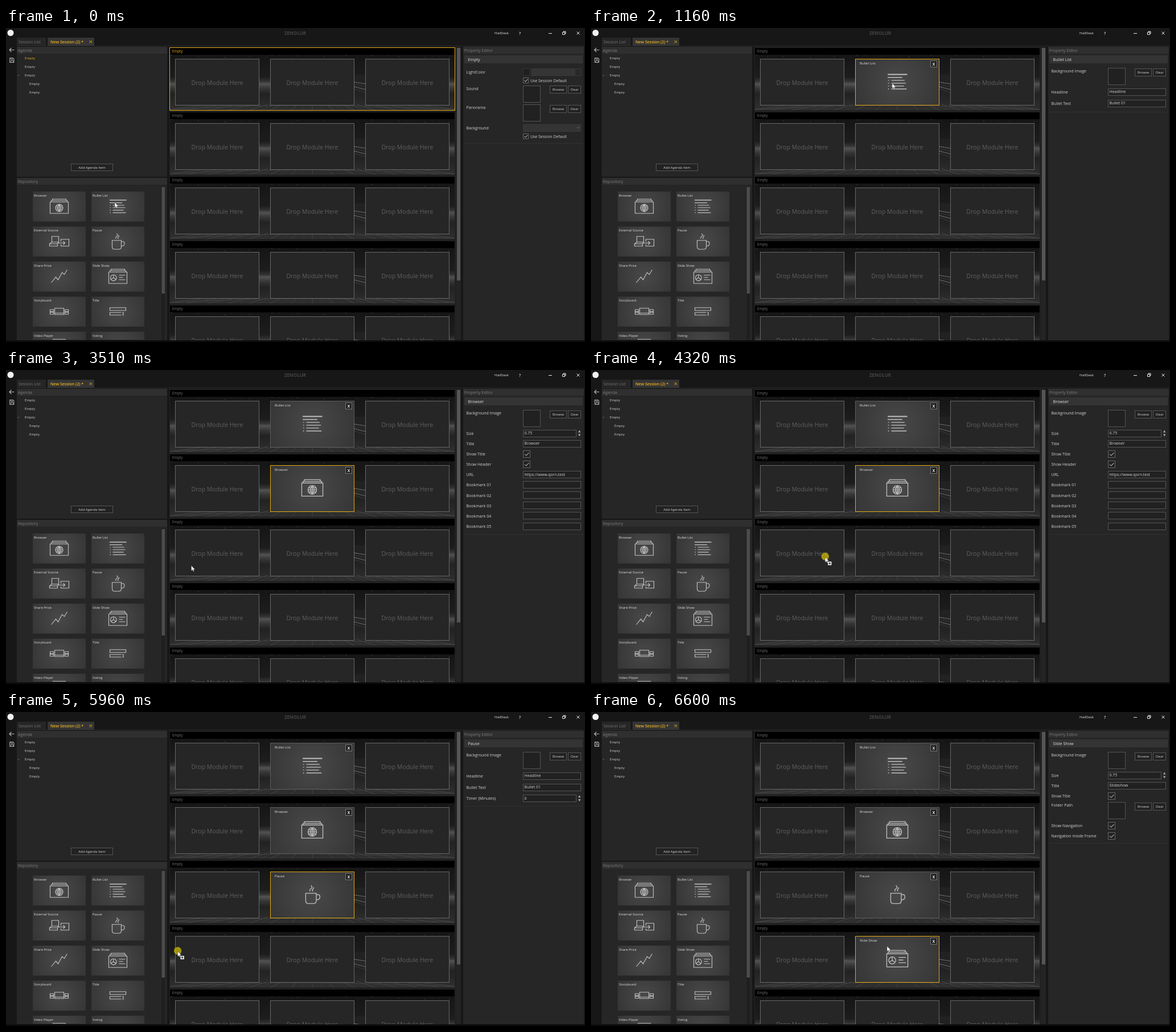
Write an HTML page with a canvas that moves like this. It is 1017 px wide and 551 px high and loops after 7.53 s.

```html
<!DOCTYPE html>
<html lang="en">
<head>
<meta charset="utf-8">
<title>Session editor</title>
<style>
html, body { margin: 0; width: 100%; height: 100%; overflow: hidden; background: #171717; }
canvas { display: block; }
</style>
</head>
<body>
<canvas id="stage" width="1017" height="551"></canvas>
<script>
const g = document.getElementById('stage').getContext('2d');
const LOOP = 7530, GOLD = '#e3a812', LIGHT = '#d2d2d2', LINE = '#545454';

// Pointer path: time, x, y
const path = [
  [0, 191, 306], [70, 191, 306], [400, 340, 210], [740, 529, 97], [1440, 529, 97],
  [1700, 345, 265], [1900, 165, 353], [2090, 93, 306], [2260, 92, 304], [2440, 270, 262],
  [2670, 505, 209], [2790, 529, 212], [3160, 529, 212], [3510, 326, 343], [3720, 235, 377],
  [3910, 200, 369], [3980, 200, 368], [4260, 370, 335], [4540, 529, 311], [4930, 529, 311],
  [5200, 330, 420], [5400, 200, 440], [5550, 167, 435], [5690, 167, 434], [5760, 169, 434],
  [5960, 301, 420], [6200, 455, 412], [6420, 520, 411], [LOOP, 520, 411]
];

const drags = [
  { name: 'Bullet List', press: 70, hover: 750, release: 890, drop: 960 },
  { name: 'Browser', press: 2260, hover: 2740, release: 3160, drop: 3230 },
  { name: 'Pause', press: 3980, hover: 4530, release: 4860, drop: 4930 },
  { name: 'Slide Show', press: 5760, hover: 6390, release: 6530, drop: 6600 }
];

// Property rows: kind, label, centre y, value
const picture = ['image', 'Background Image', 75.5];
const headline = ['field', 'Headline', 112, 'Headline'];
const bullet = ['field', 'Bullet Text', 132, 'Bullet 01'];
const size = ['spin', 'Size', 111, '0.75'];
const showTitle = ['check', 'Show Title', 147.5];
const properties = {
  'Empty': { end: 202, rows: [
    ['colour', 'LightColor', 77], ['image', 'Sound', 106], ['image', 'Panorama', 139.5], ['list', 'Background', 175]] },
  'Bullet List': { end: 147, rows: [picture, headline, bullet] },
  'Browser': { end: 288, rows: [
    picture, size, ['field', 'Title', 129, 'Browser'], showTitle, ['check', 'Show Header', 165.5],
    ['field', 'URL', 183.5, 'https://www.qorn.test'],
    ...[1, 2, 3, 4, 5].map(n => ['field', 'Bookmark 0' + n, 183.5 + n * 18.1, ''])] },
  'Pause': { end: 165, rows: [picture, headline, bullet, ['spin', 'Timer (Minutes)', 151.5, '0']] },
  'Slide Show': { end: 230, rows: [
    picture, size, ['field', 'Title', 129, 'Slideshow'], showTitle, ['image', 'Folder Path', 163.5],
    ['check', 'Show Navigation', 199.5], ['check', 'Navigation inside Frame', 217.5]] }
};

function fill(x, y, w, h, colour) {
  g.fillStyle = colour;
  g.fillRect(x, y, w, h);
}
function box(x, y, w, h, inside, edge) {
  x = Math.round(x); y = Math.round(y);
  if (inside) fill(x, y, w, h, inside);
  g.strokeStyle = edge;
  g.lineWidth = 1;
  g.strokeRect(x + .5, y + .5, w - 1, h - 1);
}
function text(s, x, y, px = 7, colour = LIGHT, weight = 400, align = 'left') {
  g.font = `${weight} ${px}px "Open Sans", "Noto Sans", sans-serif`;
  g.textAlign = align;
  g.fillStyle = colour;
  g.fillText(s, x, y);
}
function draw(d, colour = LIGHT, width = 1, solid) {
  const p = new Path2D(d);
  g.strokeStyle = g.fillStyle = colour;
  g.lineWidth = width;
  solid ? g.fill(p) : g.stroke(p);
}
function dot(x, y, r, colour) {
  g.fillStyle = colour;
  g.beginPath();
  g.arc(x, y, r, 0, 7);
  g.fill();
}
function clipped(x, y, w, h, paint) {
  g.save();
  g.beginPath();
  g.rect(x, y, w, h);
  g.clip();
  paint();
  g.restore();
}

const folder = 'M-16-8H16V12H-16ZM-14-8V-10.5H14V-8M-12-10.5V-13H12V-10.5';
const icons = {
  'Browser': folder + 'M-6.500 2.500a6.500 6.500 0 1 0 13 0a6.500 6.500 0 1 0-13 0H6.500M0-4V9M0-4q-6 6.500 0 13q6-6.500 0-13M-5.500-.5H5.500M-5.500 5.500H5.500',
  'Bullet List': 'M-14.500-11.500H15M-14.500-11H15M-14.500-6.700H7.500M-9-2.300H11M-9 2H13M-9 6.400H10M-9 10.800H14' +
    [-2.3, 2, 6.4, 10.8].map(y => `M-14 ${y}h1.5`).join(''),
  'External Source': 'M-13-9H-1V1H-13ZM-17 4H-3V8H-17ZM-13 1L-17 4M-1 1L-3 4M3 0V-4H17V8H3V5M-3 2.500H10M7-.5L10 2.500L7 5.500',
  'Pause': 'M-10-2H6V9Q6 13.500 1.500 13.500H-5.500Q-10 13.500-10 9ZM6 0H9Q11.500 0 11.500 3.500Q11.500 8 6 8M-3-5Q-5-7-2-9T-2-14M1-5Q-1-7 1-8.500T1-11',
  'Share Price': 'M-14 10.500L-6 1L-2 5.500L5-7L9-4L14-12M-7 1h2M-3 5.500h2M4-7h2M8-4h2',
  'Slide Show': folder + 'M-13 2a5.300 5.300 0 1 0 10.600 0a5.300 5.300 0 1 0-10.600 0M-7.700-3.300V2L-3.500 5M-7.700 2L-12 4.500M2-2.500H13M2 1.500H9M2 5.500H13',
  'Storyboard': 'M-8-6H8V5H-8ZM-8 2.500H8M-16-3.500H-10V0H-16ZM-16 1H-10V4.500H-16ZM10-3.500H16V0H10ZM10 1H16V4.500H10Z',
  'Title': 'M-14-7H14V-2H-14ZM6 1.500H-14V6H6M8 1.500h2.500M9.200 1.500V6M8 6h2.500',
  'Video Player': 'M-11-13H11V12H-11Z',
  'Voting': ''
};

function tile(x, y, w, h, name, scale) {
  const cx = x + w / 2, cy = y + h / 2;
  const shade = g.createRadialGradient(cx, cy, 0, cx, cy, w * .58);
  shade.addColorStop(0, '#494949');
  shade.addColorStop(1, '#353535');
  fill(x, y, w, h, shade);
  g.save();
  g.translate(cx, cy - (scale > 1 ? .5 : 0));
  g.scale(scale, scale);
  draw(icons[name], '#c0c0c0', 1.15);
  g.restore();
}

function tick(x, y, side) {
  box(x, y, side, side, '#222', '#666');
  const s = side / 13;
  draw(`M${x + 3 * s} ${y + 6.5 * s}l${2.7 * s} ${2.7 * s}l${4.8 * s} ${-5.2 * s}`, '#e4e4e4');
}
function button(x, y, w, label, h = 14) {
  box(x, y, w, h, '#222', LINE);
  text(label, x + w / 2, y + h / 2 + 2.2, 5.9, LIGHT, 400, 'center');
}

function frame() {
  fill(0, 0, 1017, 551, '#171717');
  dot(8, 8.5, 5.5, '#f2f2f2');
  text('ZENOLUR', 508, 12, 8.1, '#444', 700, 'center');
  text('HallDesk', 858, 11, 6.1, '#e5e5e5');
  text('?', 901, 11.5, 7, '#e5e5e5', 600);
  draw('M953 9.500h6M977.500 7.500h4v4h-4ZM979 7.500V6h4v4h-1.500M1002.500 6.500l5 5m0-5l-5 5', '#e5e5e5');
  draw('M14.500 38.500H6M9.500 35L6 38.500L9.500 42', '#bbb', 1.1);
  draw('M6.500 52.500h6l1.500 1.500v6.500h-7.500ZM8.500 52.500v2.500h3.500v-2.500M8.500 60v-3h4v3', '#aaa');

  fill(19, 17, 51, 14, '#262626');
  text('Session List', 22, 26.5, 7.2, '#747474');
  fill(73, 17, 82, 14, '#353535');
  text('New Session (2) *', 78, 27, 7, '#f0b41c', 600);
  draw('M146.500 22l4.500 4.500m0-4.500l-4.500 4.500', GOLD);
  fill(19, 31, 998, 1, '#2a2a2a');

  for (const [x, y, w, h, label] of [
    [19, 33, 264, 228, 'Agenda'], [19, 263, 264, 285, 'Repository'], [803, 33, 212, 515, 'Property Editor']]) {
    fill(x, y, w, h, '#262626');
    fill(x, y, w, 12, '#2f2f2f');
    text(label, x + 2, y + 9, 7.1, '#7c7c7c');
  }
  fill(0, 548, 1017, 3, '#0d0d0d');
}

function agenda(active) {
  for (let i = 0; i < 5; i++)
    text('Empty', i > 2 ? 41 : 33, 55.3 + i * 14.85, 6.1, !i && active ? '#f0b41c' : LIGHT);
  draw('M20.500 82.500l1.500 1.500l1.500-1.500', '#777', .8);
  button(114, 238, 74, 'Add Agenda Item', 13);
}

function repository() {
  fill(273, 277, 6, 271, '#1f1f1f');
  fill(273.5, 279, 5.5, 187, '#4c4c4c');
  clipped(19, 276, 254, 271, () => Object.keys(icons).forEach((name, i) => {
    const x = i % 2 ? 150 : 47, y = 287 + (i >> 1) * 61.5;
    tile(x, y, 93, 52.5, name, 1);
    text(name, x + 2, y + 8.7, 5.9, '#e0e0e0');
  }));
}

// Dim stadium behind the slots
function stadium(y) {
  const sky = g.createLinearGradient(0, y + 13, 0, y + 111);
  [[0, '#151515'], [.4, '#1d1d1d'], [.48, '#343434'], [.52, '#525252'], [.6, '#363636'], [.7, '#222'], [1, '#303030']]
    .forEach(([stop, colour]) => sky.addColorStop(stop, colour));
  fill(288, y + 13, 500, 98, sky);
  for (let i = 0; i < 34; i++) {
    const r = Math.abs(Math.sin(i * 91.7) * 437) % 1;
    fill(290 + i * 14.6 + r * 9, y + 13.5 + r * 5, 1.2, .8, i % 3 ? '#3c3c3c' : '#666');
  }
  fill(612, y + 48, 19, 32, '#222');
  g.setLineDash([2, 1]);
  for (let i = 0; i < 4; i++)
    draw(`M612 ${y + 61 + i * 4}l19 ${3 + i}`, i % 2 ? '#3a3a3a' : '#727272', 1.5);
  g.setLineDash([]);
  for (let i = -14; i <= 14; i++)
    draw(`M${538 + i * 13} ${y + 100}L${538 + i * 19} ${y + 111}`, i % 2 ? '#383838' : '#484848', .9);
  draw(`M288 ${y + 109}Q420 ${y + 101} 538 ${y + 102}T788 ${y + 109}`, '#464646', .8);
}

function sessionRow(i, t, latest) {
  const y = 34 + i * 113, drag = drags[i], active = !i && latest < 0;
  stadium(y);
  fill(287, y, 502, 13, '#000');
  text('Empty', 292, y + 8.7, 6.2, active ? '#f0b41c' : '#757575');
  for (const x of [297, 464, 631]) {
    const middle = x === 464 && drag;
    if (middle && t >= drag.drop) {
      tile(x, y + 20, 148, 82, drag.name, 1.16);
      box(x, y + 20, 148, 82, null, i === latest ? GOLD : '#5c5c5c');
      text(drag.name, x + 8, y + 29.8, 6.1, '#e0e0e0');
      box(x + 132, y + 23, 12, 12, '#222', '#777');
      text('X', x + 138, y + 31.6, 6.6, '#eee', 700, 'center');
      continue;
    }
    const hovered = middle && t >= drag.hover;
    box(x, y + 20, 148, 82, '#262626', '#686868');
    if (hovered) {
      fill(x - 1, y + 19, 150, 82, '#165a18');
      g.strokeStyle = '#858585';
      g.lineWidth = 1.8;
      g.strokeRect(x + .5, y + 23, 147, 76);
    }
    text('Drop Module Here', x + 74, y + 65.5, 10.5, hovered ? '#34703a' : '#606060', 500, 'center');
  }
  box(287, y, 502, 111, null, active ? GOLD : '#242424');
}

function sessions(t, latest) {
  fill(287, 33, 512, 515, '#202020');
  clipped(287, 33, 502, 515, () => {
    for (let i = 0; i < 5; i++) sessionRow(i, t, latest);
  });
  fill(791, 34, 8, 514, '#242424');
  fill(792, 35, 6, 408, '#555');
}

function propertyEditor(name) {
  const { rows, end } = properties[name];
  fill(805, 48, 208, 14, '#343434');
  text(name, 811.5, 57.8, 7.2, '#e0e0e0');
  fill(805, end, 208, 1, '#303030');
  for (const [kind, label, y, value] of rows) {
    text(label, 808.5, y + 2.8, 7.05);
    if (kind === 'image') {
      box(908, y - 5.5, 31, 30, '#212121', LINE);
      button(955, Math.round(y - 5), 30, 'Browse');
      button(987, Math.round(y - 5), 23, 'Clear');
    } else if (kind === 'check') {
      tick(908, Math.round(y - 6.5), 13);
    } else if (kind === 'field' || kind === 'spin') {
      box(908, y - 6.5, kind === 'spin' ? 94 : 102, 13, '#212121', LINE);
      text(value, 910.5, y + 2.4, 7);
      if (kind === 'spin')
        draw(`M1005 ${y - 1.5}l2.200-4l2.200 4ZM1005 ${y + 1.5}l2.200 4l2.200-4Z`, '#aaa', 1, true);
    } else {
      if (kind === 'colour') {
        box(908, y - 6, 13, 13, '#202020', '#343434');
        box(923, y - 6, 87, 13, '#353535', '#3b3b3b');
        fill(1000, y - 5, 9, 11, '#282828');
      } else {
        box(908, y - 6, 102, 13, '#343434', '#3b3b3b');
        draw(`M1003 ${y - 1}l2 2l2-2`, '#666');
      }
      tick(908, y + 10, 10);
      text('Use Session Default', 921, y + 17.8, 6.95);
    }
  }
}

function pointerAt(t) {
  const i = path.findIndex(k => k[0] > t) - 1;
  const a = path[i], b = path[i + 1], span = b[0] - a[0], u = (t - a[0]) / span;
  const slope = (k, c) => {
    const p = path[k - 1], q = path[k], n = path[k + 1];
    return !p || !n || p[c] === q[c] || q[c] === n[c] ? 0 : (n[c] - p[c]) / (n[0] - p[0]);
  };
  return [1, 2].map(c => {
    const ease = u * u * (3 - 2 * u);
    return a[c] + (b[c] - a[c]) * ease +
      span * u * (1 - u) * ((1 - u) * slope(i, c) - u * slope(i + 1, c));
  });
}

function pointer(t) {
  const [x, y] = pointerAt(t);
  const dragging = drags.some(d => t >= d.press && t < d.release);
  g.save();
  g.translate(x, y);
  if (dragging) {
    dot(0, -1, 6.7, 'rgba(190,174,10,.82)');
    box(5, 8, 6, 6, '#fff', '#ddd');
    draw('M6 11h4M8 9v4', '#111');
  }
  const arrow = 'M0 0V9.200L2.200 7.300L3.600 10.400L5 9.800L3.700 6.800H6.500Z';
  draw(arrow, '#fff', 1, true);
  draw(arrow, '#222', .4);
  g.restore();
}

function render(now) {
  const t = now % LOOP;
  const latest = drags.filter(d => t >= d.drop).length - 1;
  frame();
  agenda(latest < 0);
  repository();
  sessions(t, latest);
  propertyEditor(latest < 0 ? 'Empty' : drags[latest].name);
  pointer(t);
}

const start = performance.now();
function loop() {
  render(performance.now() - start);
  requestAnimationFrame(loop);
}
loop();
</script>
</body>
</html>
```
